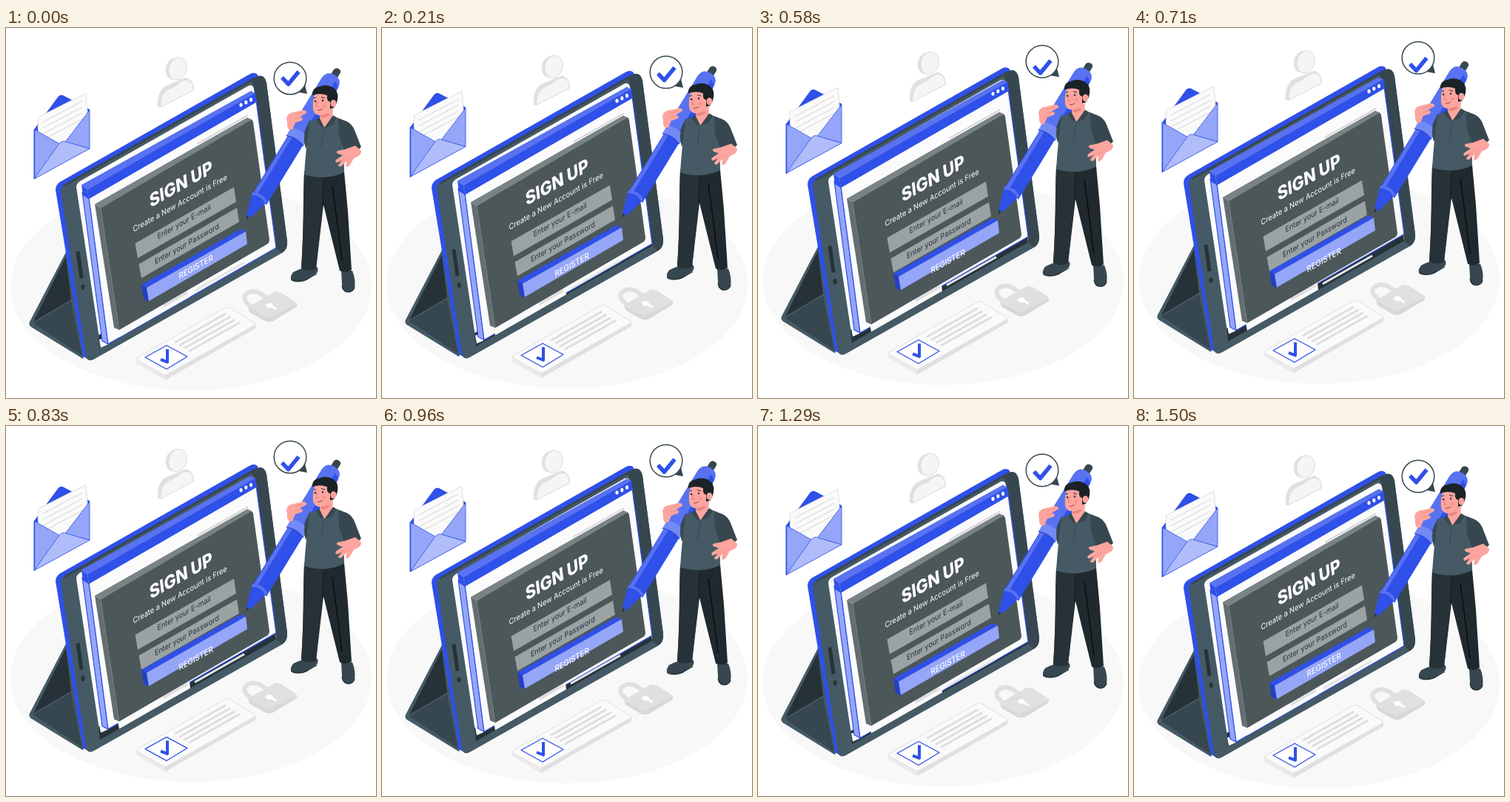
These frames come from a looping animation (500x500 px, 1540 ms). An HTML page with a canvas:

```html
<!DOCTYPE html>
<html lang="en">
<head>
<meta charset="utf-8">
<title>Sign up</title>
<style>
html, body { margin: 0; width: 100%; height: 100%; overflow: hidden; background: #fff; }
canvas { display: block; }
</style>
</head>
<body>
<canvas id="stage" width="500" height="500"></canvas>
<script>
const ctx = document.getElementById('stage').getContext('2d');
const LOOP = 1540, LIFT = 10, PHASE = 20;
const BLUE = '#2f50e9', MID = '#5872f1', PALE = '#95a6f8', SOFT = '#b0bdfa';
const INK = '#263238', DARK = '#37474f', SLATE = '#455a64', SKIN = '#fba59e';
const GREY = '#e0e0e0', LIGHT = '#f5f5f5';
const SANS = 'Inter, Roboto, sans-serif';

const paths = new Map();
function shape(d, fill, stroke, width = 1) {
  if (!paths.has(d)) paths.set(d, new Path2D(d));
  const path = paths.get(d);
  if (fill) { ctx.fillStyle = fill; ctx.fill(path); }
  if (stroke) { ctx.strokeStyle = stroke; ctx.lineWidth = width; ctx.stroke(path); }
}
const line = (d, color, width) => shape(d, null, color, width);

function oval(x, y, rx, ry, fill, stroke, width = 1, turn = 0) {
  ctx.beginPath();
  ctx.ellipse(x, y, rx, ry, turn, 0, Math.PI * 2);
  if (fill) { ctx.fillStyle = fill; ctx.fill(); }
  if (stroke) { ctx.strokeStyle = stroke; ctx.lineWidth = width; ctx.stroke(); }
}

function at(dy, draw) {
  ctx.save();
  ctx.translate(0, dy);
  draw();
  ctx.restore();
}

// Text lying on the plane of the tilted screen
function label(text, x, y, size, weight, color) {
  ctx.save();
  ctx.transform(0.87, -0.49, 0.12, 1, x, y);
  ctx.font = `${weight} ${size}px ${SANS}`;
  ctx.fillStyle = color;
  ctx.fillText(text, 0, 0);
  ctx.restore();
}

function drawUser() {
  shape('M205 107V97Q208 80 219 77L243 67Q254 70 254 84L209 107Z', GREY);
  shape('M209 107Q207 91 219 83Q228 80 237 72Q250 66 253 79V84Z', LIGHT, '#dcdcdc');
  oval(228, 55, 12, 15, GREY, null, 1, 0.3);
  oval(232, 55, 12, 15.5, LIGHT, '#dcdcdc', 1, 0.3);
}

function drawEnvelope() {
  shape('M38 137L71 92Q75 89 79 92L113 110V163L38 204Z', BLUE);
  shape('M43 121L108 88L111 126L84 158L44 158Z', '#fafafa', GREY);
  for (let i = 0; i < 4; i++) line(`M50 ${127 + i * 8}L103 ${99 + i * 8}`, '#d4d4d4', 1);
  shape('M38 137L75 158L38 204Z', PALE, BLUE, 0.8);
  shape('M113 111V163L80 154Z', PALE, BLUE, 0.8);
  shape('M38 204L72 156Q77 151 82 154L113 163Z', SOFT, BLUE, 0.8);
  line('M38.5 137V204', BLUE, 1.4);
}

function drawCard() {
  shape('M176 446L215 470V476L176 453Z', '#ebebeb');
  shape('M215 470L337 400V406L215 476Z', GREY);
  shape('M178 445L296 378Q299 376 302 378L335 398Q338 400 335 402L218 468Q215 470 212 468L178 449Q175 447 178 445Z', '#fafafa', GREY);
  for (let i = 0; i < 4; i++) {
    const x = 228 + i * 6.3, y = 425 + i * 4;
    line(`M${x} ${y}l69 -39`, '#dedede', 3);
  }
  shape('M188 445L217 429L245 444L217 461Z', '#fff', BLUE, 1.3);
  line('M209 448L218 451.5V434', BLUE, 4);
}

function drawLock() {
  line('M336 381L325 371Q318 362 329 357Q338 354 346 360L359 369', GREY, 6);
  shape('M329 376L362 357Q367 355 372 358L391 370Q396 374 391 378L361 395Q355 398 350 395L329 383Q325 379 329 376Z', GREY);
  shape('M329 379L354 392L393 373V376L361 396Q355 398 350 396L329 384Z', '#d8d8d8');
  oval(356, 375, 5, 3.2, '#fff');
  line('M358 376L366 380', '#fff', 3);
}

function drawStand() {
  shape('M82 301L32 397Q30 401 34 404L104 447L112 420Z', SLATE);
  shape('M81 309L37 397L88 367Z', INK);
  shape('M37 399L88 369L103 443Z', DARK);
}

function drawTablet() {
  shape('M67 219Q67 212 73 208L330 62Q336 59 340 63L352 120L112 448L104 444Z', BLUE);
  shape('M74 220Q74 214 80 211L336 67Q349 61 352 74L380 288Q381 299 373 304L120 447Q110 453 108 443Z', SLATE);
  shape('M338 66Q349 61 352 74L380 288Q381 299 373 304L365 297L334 76L330 70Z', DARK);
  line('M78 213L336 68', DARK, 3);
  line('M97 302L102 338', INK, 5);
  oval(104, 350, 2.6, 3.6, INK);
  shape('M95 215Q95 210 100 207L326 79Q333 75 335 82L365 296L128 432Z', '#fbfbfb');
  shape('M125 415L362 279L365 297L127 433Z', INK);
}

function drawPage() {
  shape('M126 421L137 418V428L128 432Z', '#fbfbfb');
  shape('M103 222L112 229L138 427L130 423Z', PALE, BLUE, 1.2);
  shape('M112 229L338 98L365 297L138 427Z', '#fbfbfb', BLUE, 1.2);
  shape('M102 212L331 85L338 89L110 218Z', MID);
  shape('M102 212L110 218L112 231L104 226Z', BLUE);
  shape('M110 218L337 88L339 100L112 231Z', BLUE);
  for (const [x, y] of [[317.5, 104], [324.3, 100.5], [331, 97]]) oval(x, y, 2.1, 2.7, '#fff');
}

function drawPanel() {
  shape('M150 403L247 347L249 363L153 418Z', '#fafafa');
  shape('M165 394L190 380L191 387L167 401Z', '#ececec');
  shape('M211 371L244 352L246 359L213 378Z', GREY);
  line('M255 355L322 317', '#e4e4e4', 3);
  line('M258 157L327 118', '#d5d5d5', 2);
  shape('M120 238L326 121L333 124L128 243Z', '#798285');
  shape('M120 238L128 243L153 408L146 405Z', '#646e71');
  shape('M128 243L330 125Q333 123 334 127L356 286Q356 290 353 292L153 408Z', '#4c575a');
  line('M128 243L153 408', '#727c7f', 0.8);
  shape('M174.5 291L308 215L311 235L178 311Z', '#9aa2a4');
  shape('M179.5 319L312 243L315 262L183 338Z', '#9aa2a4');
}

function drawButton() {
  shape('M183 347L317 272L324 275L190 351Z', BLUE);
  shape('M183 347L190 351L193 370L186 366Z', '#2340c4');
  shape('M190 351L324 275L326 292L193 369Z', PALE);
}

function drawLabels() {
  label('SIGN UP', 195, 243, 24, 800, '#fff');
  label('Create a New Account is Free', 172, 276, 10.4, 400, '#fff');
  label('Enter your E-mail', 205, 285.5, 10.2, 400, INK);
  label('Enter your Password', 201.5, 319.5, 10.2, 400, INK);
  label('REGISTER', 234, 339.5, 11, 500, '#fff');
}

function drawPen() {
  ctx.save();
  ctx.translate(325, 258);
  ctx.rotate(Math.atan2(-199, 122));
  shape('M223 -5H234Q238 -4 238 0Q238 5 234 5H223Z', DARK);
  shape('M-1 0L8 -3V3Z', INK);
  shape('M5 -3L32 -11Q39 0 32 11L5 4Q3 0 5 -3Z', BLUE);
  shape('M30 -11H128V13H30Q37 0 30 -11Z', BLUE);
  shape('M36 -10H126V-5H36Z', MID);
  shape('M31 -11Q38 0 31 11L35 12Q42 0 35 -12Z', MID);
  shape('M130 -13H216Q228 -12 228 0Q228 12 216 13H130Z', MID);
  shape('M138 5H221Q218 13 212 13H138Z', BLUE);
  shape('M124 -13H137Q143 0 137 14H124Q130 0 124 -13Z', '#7389f4');
  line('M124 -13Q130 0 124 14', '#2340c4', 1);
  ctx.restore();
}

function drawLegs() {
  shape('M388 330Q398 325 401 325L418 322Q424 324 420 331Q412 336 406 341Q396 345 387 342Q382 338 388 330Z', DARK);
  shape('M453 328L468 328Q473 340 471 352Q468 358 459 357Q453 354 454 346Z', DARK);
  line('M385 340Q395 344 406 340L420 332', INK, 1.2);
  line('M454 348Q456 356 463 357Q470 356 471 350', INK, 1.2);
  shape('M403 194H457L462 248L467 327Q459 332 451 328L429 239L419 325Q409 330 399 325Q402 280 402 230Z', '#20292d');
  shape('M403 194H429L428 239L419 325Q409 330 399 325Q402 280 402 230Z', INK);
  line('M429 205L428 241', '#11181b', 1);
  line('M441 213Q448 265 454 314', '#090e10', 1.5);
}

function drawBody() {
  shape('M405 136Q401 150 405 163L414 143L411 124Z', DARK);
  shape('M410 128Q417 122 427 122L447 121Q458 124 464 132L460 157Q456 175 457 195Q432 207 403 198Q405 165 410 128Z', SLATE);
  shape('M449 123Q466 125 471 138L480 161Q471 170 458 168L450 145Z', DARK);
  shape('M424 109H442L441 123Q437 133 429 134L424 124Z', SKIN);
  shape('M424 115L438 116Q433 123 425 121Z', '#e98880');
  shape('M423 120L430 134L425 133L419 124Z', DARK);
  shape('M442 118L447 121L441 131L430 135Z', DARK);
  line('M430 135L426 161', DARK, 1);
}

function drawHands() {
  shape('M380 127Q377 119 384 115L401 111Q407 111 406 115L397 120Q403 121 400 125L391 128L387 137L383 138Q379 134 380 127Z', SKIN);
  line('M390 118L401 114M390 123L399 121', '#e98880', 0.8);
  shape('M458 164L472 159L480 166Q481 172 470 176L466 183Q463 189 459 187L460 180L453 187Q449 188 449 185L454 179L447 182Q444 181 446 178L455 172L449 170Q445 168 448 166Z', SKIN);
  line('M461 179L464 174M454 179L460 174', '#e98880', 0.8);
}

function drawHead() {
  shape('M417 90Q414 99 415 110Q417 118 424 118Q434 118 439 110L444 96L438 86Z', SKIN);
  shape('M414 91Q413 81 424 79Q435 75 444 82Q451 88 447 101L443 108L438 109L438 100Q433 99 434 91Q424 87 414 91Z', '#1b2326');
  oval(442.5, 102, 4, 5, SKIN);
  line('M443 100Q440 102 442 105', '#e98880', 0.8);
  oval(418, 99, 1.1, 1.5, INK);
  oval(428, 98, 1.1, 1.5, INK);
  line('M415.5 95L419 94M426 93.5L431 94.5', INK, 1);
  line('M421 98L419 106L423 106', '#e9776f', 0.9);
  line('M421 111Q425 112 428 109', '#9e3e3b', 1);
  oval(430, 105, 2.5, 2, '#f88f89');
}

function drawBubble() {
  shape('M396 87L407 89L404 77Z', DARK);
  oval(384, 68, 21.8, 21.8, '#fff', DARK, 1.5);
}

function drawScene(time) {
  const phase = ((time + PHASE) % LOOP) / LOOP;
  const rise = 1 - Math.abs(1 - 2 * phase);
  const rest = 2 * PHASE / LOOP;
  const y = -LIFT * (rise - rest);

  ctx.fillStyle = '#fff';
  ctx.fillRect(0, 0, 500, 500);
  at(y, () => {
    oval(250, 349, 244, 141, '#f8f8f8');
    drawUser();
    drawEnvelope();
    drawCard();
    drawLock();
    drawStand();
    drawTablet();
    // Nested layers float further than the layer they sit on
    at(y, drawPage);
    drawPanel();
    at(y, drawButton);
    drawLabels();
    drawLegs();
    drawPen();
    drawBody();
    drawHands();
    drawHead();
    at(2 * y, drawBubble);
    at(y, () => line('M373 67L381.5 76L395.5 59', BLUE, 5.5));
  });
}

ctx.lineJoin = 'round';
function tick() {
  drawScene(performance.now());
  requestAnimationFrame(tick);
}
tick();
</script>
</body>
</html>
```
